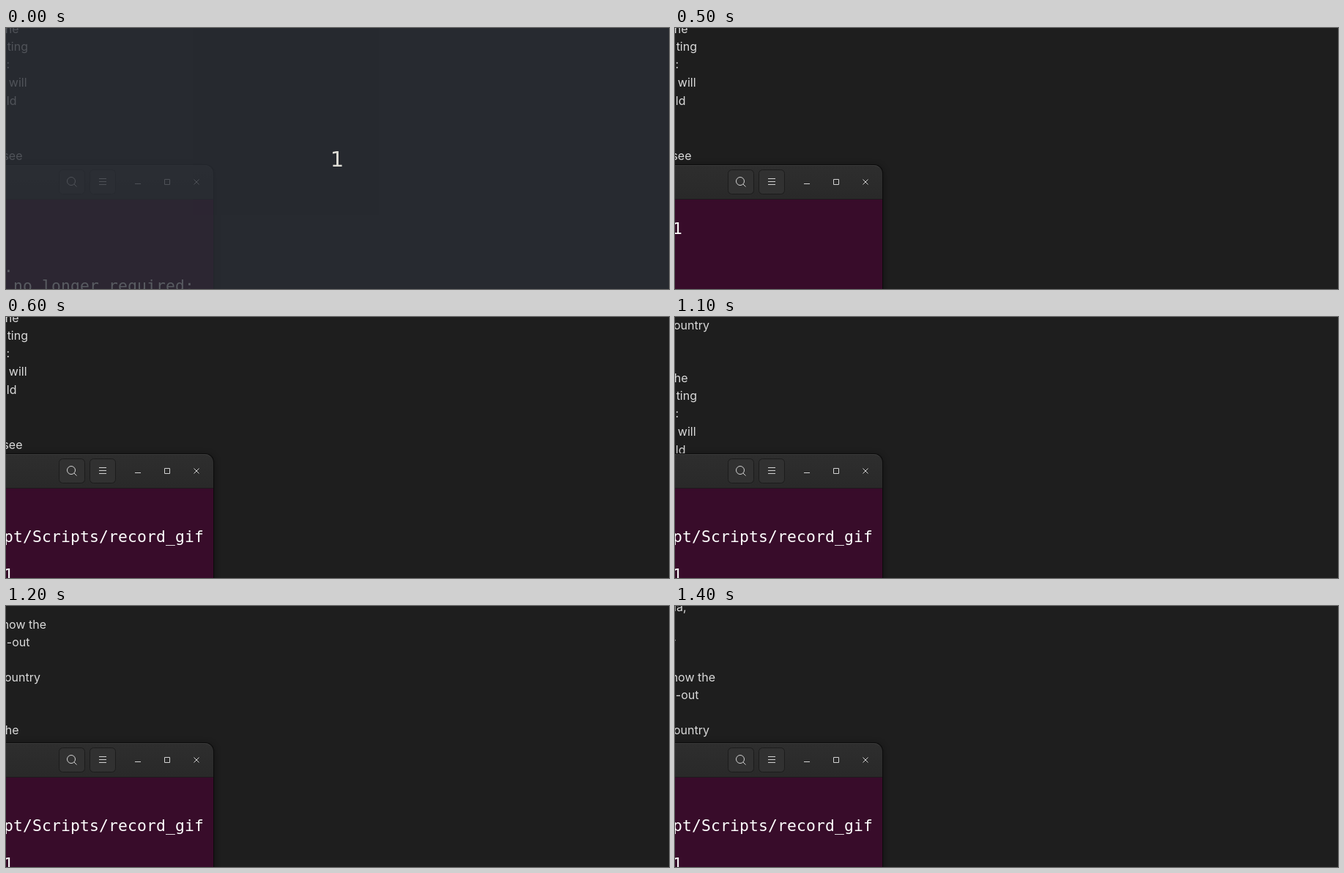
An HTML page for the animation above (1.9 s loop, 905 by 356 pixels).

```html
<!DOCTYPE html>
<html lang="en">
<head>
<meta charset="utf-8">
<title>Terminal recording</title>
<style>
  html, body { margin: 0; width: 100%; height: 100%; overflow: hidden; background: #1e1e1e; }
  svg { display: block; width: 905px; height: 356px; }

  .doc { font: 16px Inter, sans-serif; fill: #dadada; text-anchor: end; }
  .term { font: 21.33px "DejaVu Sans Mono", monospace; letter-spacing: .16px; fill: #fff; }
  .count { font: 29px "DejaVu Sans", sans-serif; fill: #deddd6; text-anchor: middle; }
  .frame { filter: drop-shadow(0 2px 5px rgba(0, 0, 0, .45)); }
  .button { fill: #313131; stroke: #1c1c1c; }
  .icons { fill: none; stroke: #d2d2d2; stroke-width: 1; }

  .doc, .veil, .before, .answer, .after { animation: 1900ms step-end infinite; }
  .doc { animation-name: scroll; }
  .veil { animation-name: veil; }
  .before { animation-name: before; }
  .answer { animation-name: answer; }
  .after { animation-name: after; }

  @keyframes veil { 0% { opacity: 1; } 5.26%, 100% { opacity: 0; } }
  @keyframes before { 0% { opacity: 1; } 26.31%, 100% { opacity: 0; } }
  @keyframes answer { 0%, 31.57%, 100% { opacity: 0; } 26.31% { opacity: 1; } }
  @keyframes after { 0% { opacity: 0; } 31.57%, 100% { opacity: 1; } }
  @keyframes scroll {
    0% { transform: translateY(0); }
    52.63% { transform: translateY(1px); }
    57.89% { transform: translateY(82px); }
    63.15% { transform: translateY(168px); }
    68.42% { transform: translateY(221px); }
    73.68%, 100% { transform: translateY(240px); }
  }
</style>
</head>
<body>
<svg viewBox="0 0 905 356">
  <defs>
    <linearGradient id="bar" x2="0" y2="1">
      <stop stop-color="#2e2e2e"/>
      <stop offset="1" stop-color="#292929"/>
    </linearGradient>
  </defs>
  <rect width="905" height="356" fill="#1e1e1e"/>

  <g class="doc">
    <text x="15.5" y="-233">la,</text>
    <text x="1" y="-185">for</text>
    <text x="55" y="-137">know the</text>
    <text x="32.5" y="-113">-out</text>
    <text x="47" y="-65">country</text>
    <text x="17.5" y="7">the</text>
    <text x="30" y="31">ting</text>
    <text x="5" y="55">:</text>
    <text x="28.5" y="80">will</text>
    <text x="14.5" y="105">ld</text>
    <text x="22.5" y="180">see</text>
  </g>

  <path class="frame" d="M-20 186H272a12 12 0 0 1 12 12V380H-20z" fill="#0c0c0c"/>
  <path d="M-20 187H271.500a11.500 11.500 0 0 1 11.500 11.500V234H-20z" fill="url(#bar)"/>
  <path d="M-20 187.500H271a11.500 11.500 0 0 1 8 3" fill="none" stroke="#3a3a3a"/>
  <path d="M-20 233H283V356H-20z" fill="#380c2a"/>
  <path d="M-20 233.500H283" stroke="#1f1a1d"/>

  <rect class="button" x="72.500" y="193.500" width="35" height="33" rx="5"/>
  <rect class="button" x="114.500" y="193.500" width="35" height="33" rx="5"/>
  <g class="icons">
    <circle cx="89" cy="209" r="5.500"/>
    <path d="M93 213l3.500 3.500"/>
    <path d="M127 205.500h10m-10 4h10m-10 4h10"/>
    <path d="M176 212.500h8"/>
    <path d="M216.500 206.500h7v7h-7z"/>
    <path d="M256.500 206.500l7 7m0-7l-7 7"/>
  </g>

  <g class="term">
    <g class="before">
      <text x="-3" y="333">.</text>
      <text x="10" y="359">no longer required:</text>
    </g>
    <text class="answer" x="-3" y="281">1</text>
    <g class="after">
      <text x="-3" y="307">pt/Scripts/record_gif</text>
      <text x="-3" y="359">1</text>
    </g>
  </g>

  <g class="veil">
    <rect width="905" height="356" fill="#292d35" fill-opacity=".78"/>
    <text class="count" x="452" y="189">1</text>
  </g>
</svg>
</body>
</html>
```
